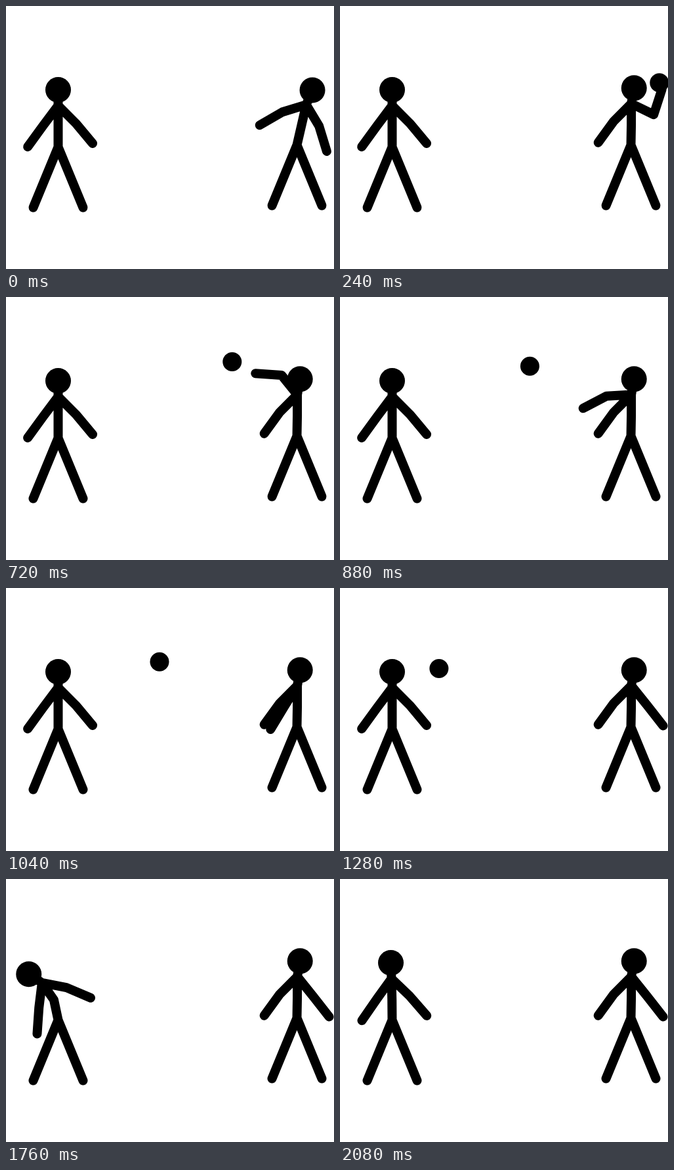
Write an HTML page that moves like this. It is 500x400 px and loops after 2160 ms.

```html
<!DOCTYPE html>
<html lang="en">
<head>
<meta charset="utf-8">
<title>Ball throw</title>
<style>
  html, body { margin: 0; width: 100%; height: 100%; overflow: hidden; background: #fff; }
  svg { display: block; width: 100%; height: 100%; }
  path { fill: none; stroke: #000; stroke-width: 14; stroke-linecap: round; stroke-linejoin: round; }
</style>
</head>
<body>
<svg viewBox="0 0 500 400">
  <g transform="translate(.5 .5)">
    <g id="catcher"><path/><circle r="19.5"/></g>
    <g id="thrower"><path/><circle r="19.5"/></g>
    <circle id="ball" r="14.5"/>
  </g>
</svg>
<script>
const STEP = 80, STEPS = 27;
const SPINE = 31.5, NECK = 24, UPPER = 38, FORE = 40;
const RELEASE = 8;

// Bone angles in degrees, clockwise from the right; arms are [upper, fore].
const standing = { spine: [-90, -90], neck: -90, left: [127, 126], right: [45, 50] };
const struck = { spine: [-102, -125], neck: -147, left: [97, 94], right: [11, 23] };
const ready = { spine: [-89, -90], neck: -80, left: [135, 126] };
const reaching = { spine: [-77, -77], neck: -67, left: [163, 150] };

// The throwing arm makes almost a full turn: [step, upper, fore].
const swing = [
  [0, 59, 73], [3, 26, -72], [9, -129, -176], [13, -238, -239], [16, -309, -308]
];

const $ = id => document.getElementById(id);
const clamp = v => Math.min(1, Math.max(0, v));

function mix(a, b, t) {
  if (Array.isArray(a)) return a.map((v, i) => mix(v, b[i], t));
  if (typeof a === "number") return a + (b - a) * t;
  return Object.fromEntries(Object.keys(a).map(k => [k, mix(a[k], b[k], t)]));
}

function swingAt(step) {
  const i = swing.findIndex(key => key[0] > step);
  if (i < 0) return swing[swing.length - 1].slice(1);
  const [from, ...a] = swing[i - 1], [to, ...b] = swing[i];
  return mix(a, b, (step - from) / (to - from));
}

function bone([x, y], length, degrees) {
  const a = degrees * Math.PI / 180;
  return [x + length * Math.cos(a), y + length * Math.sin(a)];
}

function limb(start, lengths, angles) {
  const points = [start];
  lengths.forEach((length, i) => points.push(bone(points[i], length, angles[i])));
  return points;
}

function place(circle, [x, y]) {
  circle.setAttribute("cx", x);
  circle.setAttribute("cy", y);
}

// Draws a figure standing on its hip point and returns its right hand.
function drawFigure(id, hip, pose) {
  const [x, y] = hip;
  const torso = limb(hip, [SPINE, SPINE], pose.spine);
  const shoulder = torso[2];
  const head = bone(shoulder, NECK, pose.neck);
  const left = limb(shoulder, [UPPER, FORE], pose.left);
  const right = limb(shoulder, [UPPER, FORE], pose.right);
  const legs = [[x - 38, y + 92], hip, [x + 38, y + 92]];
  const lines = [[...torso, head], legs, left, right];
  $(id).querySelector("path").setAttribute("d", lines.map(p => "M" + p.join("L")).join(""));
  place($(id).querySelector("circle"), head);
  return right[2];
}

function draw(step) {
  const hit = clamp(1 - 0.24 * (Math.abs(step - 21.5) - 0.5));
  drawFigure("catcher", [79, 214], mix(standing, struck, hit));

  const arm = swingAt(step);
  const body = mix(reaching, ready, clamp(step / 3));
  const hand = drawFigure("thrower", [443, 211], { ...body, right: arm });

  const flight = step - RELEASE;
  place($("ball"), flight < 0
    ? bone(hand, 11, arm[1] - 38)
    : [372 - 27.7 * flight, 94.5 + 3.45 * flight]);
  // The ball is picked up out of view.
  $("ball").style.display = step < 1 ? "none" : "";
}

const start = performance.now();
function tick() {
  draw(Math.floor((performance.now() - start) / STEP) % STEPS);
  requestAnimationFrame(tick);
}
tick();
</script>
</body>
</html>
```
